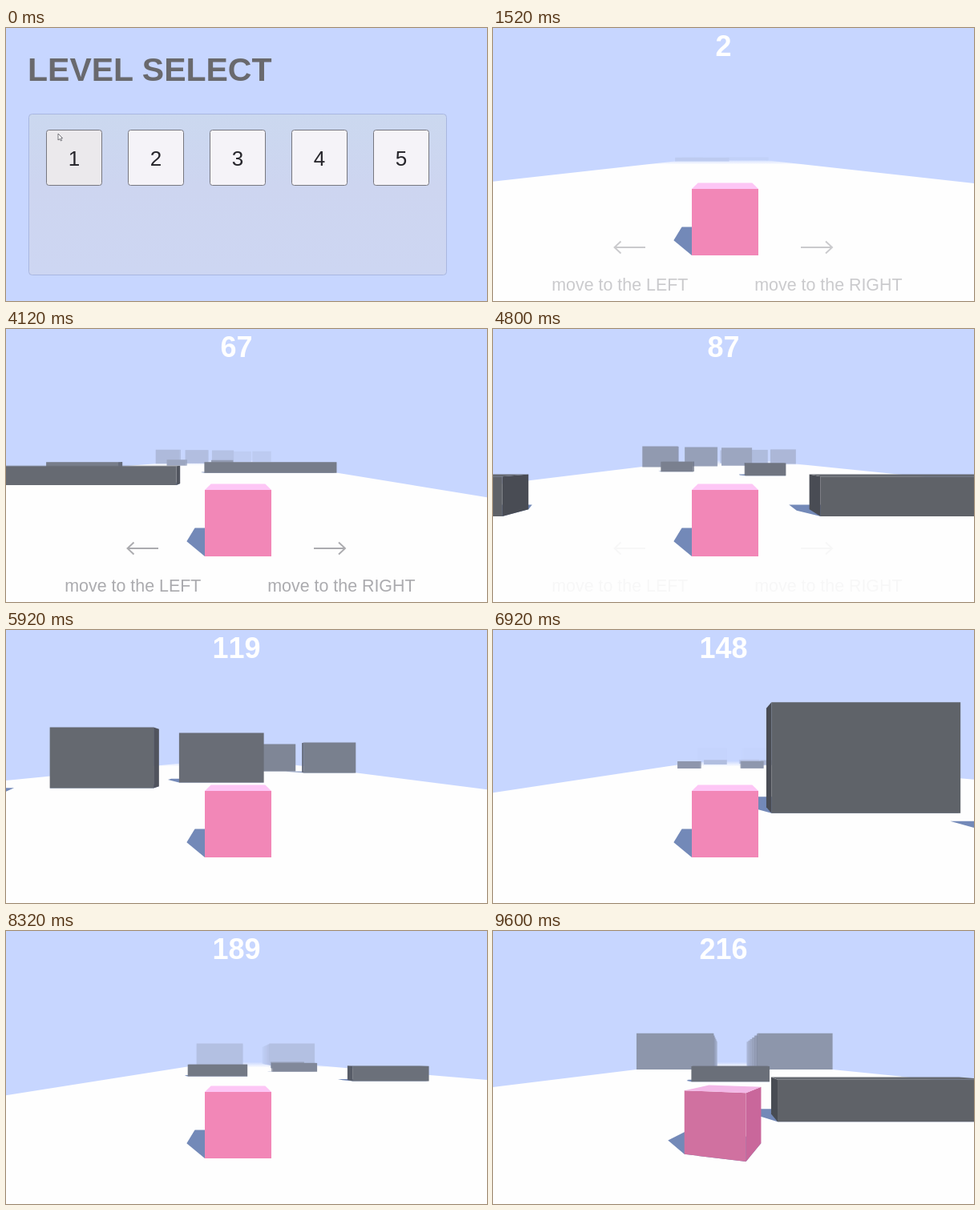
An HTML page that plays this animation: 600x341 px, repeating every 9.72 s.

```html
<!DOCTYPE html>
<html lang="en">
<head>
<meta charset="utf-8">
<title>Cube runner</title>
<style>
  html, body { margin: 0; width: 100%; height: 100%; overflow: hidden; background: #c7d6ff; }
  svg { display: block; width: 100vw; height: 100vh; font-family: "Liberation Sans", Arial, sans-serif; }
  text { text-anchor: middle; }
  #score { font-kerning: none; }
</style>
</head>
<body>
<svg viewBox="0 0 600 341" preserveAspectRatio="none">
  <defs>
    <linearGradient id="ground" gradientUnits="userSpaceOnUse" x1="0" y1="163.5" x2="0" y2="170.5">
      <stop offset="0" stop-color="#c7d6ff"/><stop offset="1" stop-color="#fefefe"/>
    </linearGradient>
    <linearGradient id="panel" x1="0" y1="0" x2="0" y2="1">
      <stop offset="0" stop-color="#cbd8ef"/><stop offset=".45" stop-color="#cdd5f0"/><stop offset="1" stop-color="#cdd6f2"/>
    </linearGradient>
  </defs>
  <rect width="600" height="341" fill="#c7d6ff"/>
  <g id="menu">
    <text x="27" y="66" font-size="41" font-weight="bold" fill="#69696d" style="text-anchor:start">LEVEL SELECT</text>
    <rect x="28.5" y="107.5" width="521" height="201" rx="4" fill="url(#panel)" stroke="#a9b7e0"/>
    <g id="buttons"></g>
    <path id="cursor" d="M0 0V8L2 6.4L3.4 9L4.6 8.4L3.4 5.8L5.6 5.6Z" fill="#fff" stroke="#55555c" stroke-width=".8"/>
  </g>
  <g id="game">
    <g id="world"></g>
    <g id="hints" fill="#87878c" font-size="21.4">
      <text x="158.3" y="328">move to the LEFT</text>
      <text x="418.4" y="328">move to the RIGHT</text>
      <path d="M190 274H152M159.5 266.5L151.5 274L159.5 281.5M384 274H422.5M415 266.5L423 274L415 281.5" fill="none" stroke="#87878c" stroke-width="1.9"/>
    </g>
    <text id="score" x="287.5" y="35" font-size="36" font-weight="bold" fill="#fff"></text>
  </g>
</svg>
<script>
const $ = id => document.getElementById(id);
const LOOP = 9720, GAME_START = 0.9, CRASH = 9.29, END = 9.6;
const SPEED = 29.14, LAG = 1.81, EASE = 0.6;
const VANISH_X = 289.5, HORIZON = 159.5, FOCAL = 373.5, EYE = 1.5, NEAR = 0.3, HALF_FLOOR = 13.5;
const SKY = [199, 214, 255], SHADE = { front: [93, 96, 101], side: [70, 73, 80], top: [99, 103, 109] };

const box = (x, z, width, height = 1) => ({ left: x - width / 2, right: x + width / 2, z, height });

// Evenly stepped boxes
const row = (count, x, stepX, z, stepZ, width, height) =>
  Array.from({ length: count }, (_, i) => box(x + i * stepX, z + i * stepZ, width, height));

// Barrier across the floor with an opening
const gate = (z, from, to, height = 1) => [
  { left: -HALF_FLOOR, right: from, z, height },
  { left: to, right: HALF_FLOOR, z, height }
].filter(b => b.right > b.left);

const course = [
  ...gate(77.6, 1.1, HALF_FLOOR),
  ...gate(89.7, -6.8, 1.2),
  ...row(2, 2, -8, 105.8, 6.2, 3.2),
  ...row(3, -10.65, 5.7, 125.6, 3.3, 5.1, 3),
  ...row(2, 5.5, 5.3, 147, -3.3, 5.1, 3),
  box(0.2, 151.4, 5.1, 3),
  ...row(2, -8.6, 8.8, 184.8, 0.4, 3.2),
  box(6.25, 204.2, 5.1), box(-5.75, 209.7, 5.1), box(2.5, 218.4, 5.1)
];
for (let z = 252.5; z < 275; z += 4) course.push(...gate(z, -2.9, 3.2, 5));

// Sideways steering: time, position
const steering = [
  [2.7, 0], [3.1, 3.6], [4.3, 3.9], [4.8, -1.2], [5.3, -1.5],
  [5.9, 1.75], [6.35, 4.7], [6.9, -3.6], [8.3, -4], [END, -1.3]
];

const clamp = (v, a = 0, b = 1) => Math.min(b, Math.max(a, v));
const mix = (a, b, t) => a.map((v, i) => v + (b[i] - v) * t);
const rgb = c => `rgb(${c.map(Math.round)})`;

// Smooth curve through points
function curve(points, t) {
  const last = points.length - 1;
  if (t <= points[0][0]) return points[0][1];
  if (t >= points[last][0]) return points[last][1];
  const i = points.findIndex(p => p[0] > t) - 1;
  const slope = k => k <= 0 || k >= last ? 0
    : (points[k + 1][1] - points[k - 1][1]) / (points[k + 1][0] - points[k - 1][0]);
  const [t0, a] = points[i], [t1, b] = points[i + 1], h = t1 - t0, u = (t - t0) / h;
  return a * (1 + 2 * u) * (1 - u) ** 2 + b * u * u * (3 - 2 * u)
    + h * u * (1 - u) * (slope(i) * (1 - u) - slope(i + 1) * u);
}

// Run-up against drag, then a bounce back after the crash
function distance(t) {
  if (t > CRASH) return distance(CRASH) - 6.7 * (t - CRASH) + 4 * (t - CRASH) ** 2;
  const run = Math.max(0, t - (LAG - EASE));
  return SPEED * (run - EASE * (1 - Math.exp(-run / EASE)));
}

function project([x, d], height) {
  const s = FOCAL / Math.max(d, NEAR);
  return `${(VANISH_X + x * s).toFixed(2)},${(HORIZON + (EYE - height) * s).toFixed(2)}`;
}
const polygon = (points, fill, extra = "") => `<polygon points="${points.join(" ")}" fill="${fill}" ${extra}/>`;
const fogged = (face, d) => rgb(mix(SHADE[face], SKY, 1 - Math.exp(-((0.0189 * d) ** 2))));

function shadow({ base: [fl, fr, br, bl], height }) {
  const cast = ([x, d]) => [x - 0.41 * height, d + 0.8 * height];
  const outline = [fr, br, cast(br), cast(bl), cast(fl), fl].map(p => project(p, 0));
  return polygon(outline, "#7389b8", `opacity="${clamp((40 - fl[1]) / 15)}"`);
}

// Upright block on four ground corners, starting front left
function block({ base, height, shade }) {
  const d = base[0][1];
  let out = "";
  [2, 3, 1, 0].forEach(i => {
    const a = base[i], b = base[(i + 1) % 4];
    if (a[0] * b[1] - b[0] * a[1] >= 0) return;
    out += polygon([project(a, 0), project(b, 0), project(b, height), project(a, height)],
      shade(i ? "side" : "front", d));
  });
  if (height < EYE) out += polygon(base.map(p => project(p, height)), shade("top", d));
  return out;
}

function playerCube(turn) {
  const cos = Math.cos(turn * 0.34), sin = Math.sin(turn * 0.34);
  const pink = {
    front: rgb(mix([242, 135, 183], [208, 113, 160], turn)),
    side: "#c9679b",
    top: rgb(mix([253, 198, 245], [243, 184, 231], turn))
  };
  const corners = [[-.5, -.5], [.5, -.5], [.5, .5], [-.5, .5]];
  return {
    depth: 4.5, height: 1, shade: face => pink[face],
    base: corners.map(([x, d]) => [x * cos + d * sin, 5 - x * sin + d * cos])
  };
}

function drawWorld(t) {
  const z = distance(t), px = curve(steering, t), camera = z - 5;
  const slider = box(3.75 - 4.7 * clamp((t - 8.3) / 1.3), 230.8, 5.1);
  const blocks = [...course, slider]
    .filter(b => b.z + 1 - camera > NEAR && b.z - camera < 130)
    .map(b => {
      const l = b.left - px, r = b.right - px, near = Math.max(b.z - camera, NEAR), far = b.z + 1 - camera;
      return { depth: near, height: b.height, shade: fogged, base: [[l, near], [r, near], [r, far], [l, far]] };
    });
  blocks.push(playerCube(clamp((t - CRASH) / (END - CRASH))));
  blocks.sort((a, b) => b.depth - a.depth);

  const l = -HALF_FLOOR - px, r = HALF_FLOOR - px;
  const floor = [[l, NEAR], [r, NEAR], [r, 140], [l, 140]].map(p => project(p, 0));
  $("world").innerHTML = polygon(floor, "url(#ground)")
    + blocks.map(shadow).join("") + blocks.map(block).join("");
  $("score").textContent = Math.round(z);
  $("hints").setAttribute("opacity", Math.min(clamp((t - GAME_START) / 1.4), clamp((4.86 - t) / 1.1)));
}

const buttons = [0, 1, 2, 3, 4].map(i => 50.5 + 102 * i);
$("buttons").innerHTML = buttons.map((x, i) =>
  `<rect x="${x}" y="127.5" width="69" height="69" rx="3" stroke="#77777f"/>
   <text x="${x + 34.5}" y="171.5" font-size="26" fill="#26252b">${i + 1}</text>`).join("");
const faces = [...$("buttons").querySelectorAll("rect")];

function drawMenu(t) {
  const angle = 2 * Math.PI * clamp(t / 0.7);
  const x = 290 - 225 * Math.cos(angle), y = 112 + 60 * Math.sin(angle + Math.PI - 0.34);
  $("cursor").setAttribute("transform", `translate(${x} ${y})`);
  faces.forEach((face, i) => {
    const over = x > buttons[i] && x < buttons[i] + 69 && y > 127 && y < 197;
    face.setAttribute("fill", over ? "#ebe9ec" : "#f5f3f8");
  });
}

// Ten pictures a second, held for 120 and 80 ms in turn
let shown = -1;
function render(ms) {
  const step = 2 * Math.floor(ms / 200) + (ms % 200 >= 120 ? 1 : 0);
  if (step === shown) return;
  shown = step;
  const t = Math.min(step / 10, END), playing = t >= GAME_START;
  $("menu").style.display = playing ? "none" : "";
  $("game").style.display = playing ? "" : "none";
  (playing ? drawWorld : drawMenu)(t);
}

const start = performance.now();
function tick() {
  render((performance.now() - start) % LOOP);
  requestAnimationFrame(tick);
}
tick();
</script>
</body>
</html>
```
